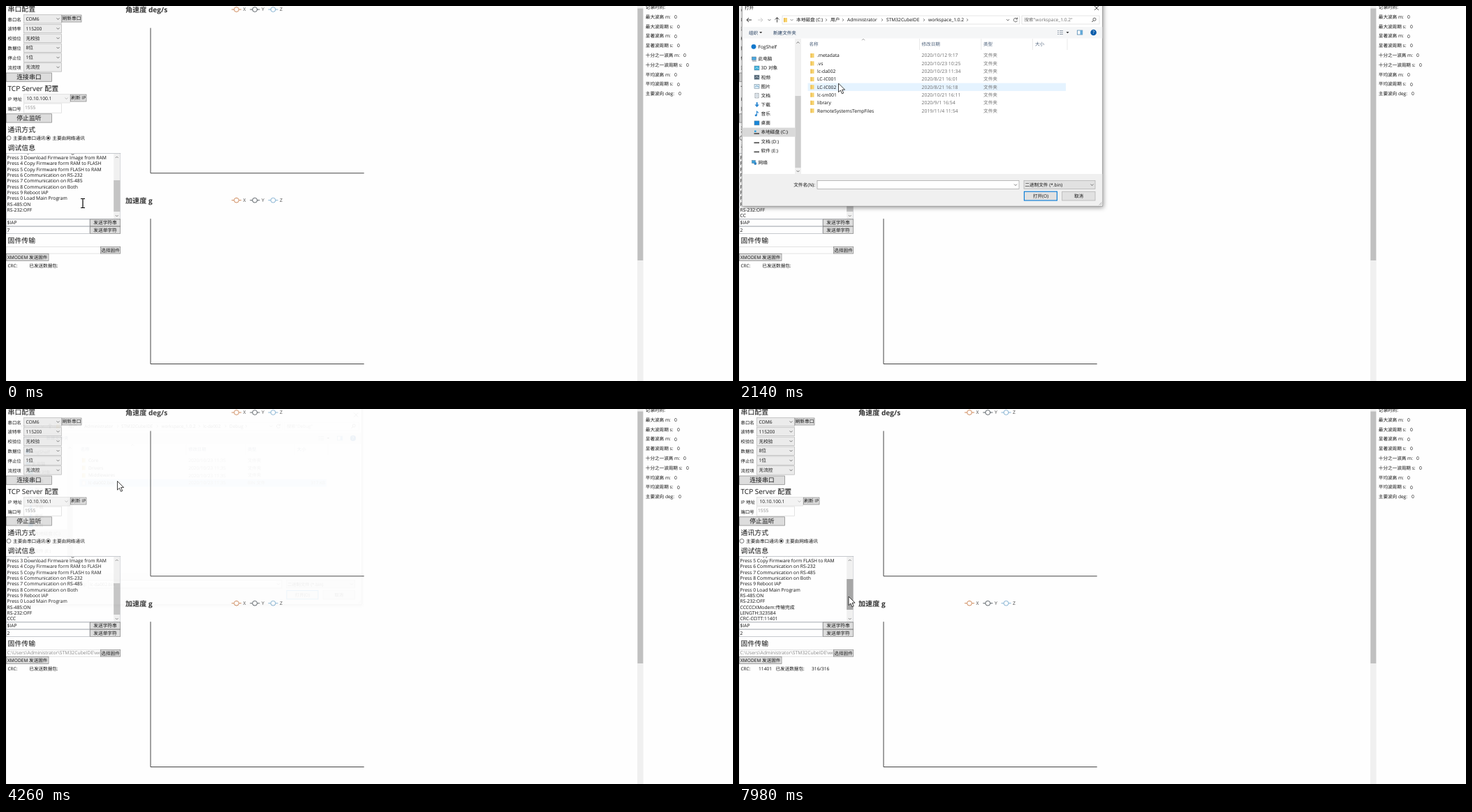
An HTML page that plays this animation: 1041 px wide and 538 px high, repeating every 8 s.

```html
<!DOCTYPE html>
<html lang="zh-CN">
<head>
<meta charset="utf-8">
<title>Firmware upload</title>
<style>
html, body { margin: 0; width: 100%; height: 100%; overflow: hidden; background: #fefefe; }
svg { display: block; }
text { font-family: "Open Sans", "Noto Sans CJK SC", "Noto Sans CJK JP", "Noto Sans CJK", sans-serif; white-space: pre; text-rendering: geometricPrecision; }
</style>
</head>
<body>
<svg id="stage" width="1041" height="538" viewBox="0 0 1041 538"></svg>
<script>
const LOOP = 8000, TICK = 76.9, LAST = 103;
const stage = document.getElementById('stage');

// y is the middle of the line
const text = (s, x, y, size = 6.7, fill = '#111', extra = '') =>
  `<text x="${x}" y="${y + size * .36}" font-size="${size}" fill="${fill}" ${extra}>${s}</text>`;
const mid = (s, x, y, size, fill) => text(s, x, y, size, fill, 'text-anchor="middle"');
const rect = (x, y, w, h, fill, stroke = 'none', width = .7) =>
  `<rect x="${x}" y="${y}" width="${w}" height="${h}" fill="${fill}" stroke="${stroke}" stroke-width="${width}"/>`;
const line = (d, stroke = '#444', width = .8, fill = 'none') =>
  `<path d="${d}" fill="${fill}" stroke="${stroke}" stroke-width="${width}"/>`;
const circle = (x, y, r, fill, stroke = 'none', width = .8) =>
  `<circle cx="${x}" cy="${y}" r="${r}" fill="${fill}" stroke="${stroke}" stroke-width="${width}"/>`;
const down = (x, y, c = '#555') => line(`M${x - 2} ${y - 1}l2 2 2-2`, c);
const up = (x, y, c = '#555') => line(`M${x - 2} ${y + 1}l2-2 2 2`, c);
const right = (x, y, c = '#555') => line(`M${x - 1} ${y - 1.8}l1.8 1.8-1.8 1.8`, c);
const clip = (x, y, w, h, body) =>
  `<svg x="${x}" y="${y}" width="${w}" height="${h}" viewBox="${x} ${y} ${w} ${h}">${body}</svg>`;

// Pointer path: tick, x, y
const track = [
  [0, 110, 283], [3, 70, 322], [5, 70, 322], [8, 142, 324], [11, 150, 326], [13, 158.5, 291.5],
  [16, 150, 346], [19, 150, 350], [22, 150, 350], [25, 140, 104], [28, 142.5, 111],
  [31, 130, 94], [34, 130, 94], [37, 148.5, 97.5], [42, 132, 117], [45, 132, 117],
  [49, 150, 106], [55, 159.5, 103.5], [59, 90, 250], [63, 45, 360], [66, 45, 362],
  [71, 105, 322], [75, 110, 340], [78, 100, 375], [84, 95, 380], [88, 110, 370],
  [92, 150, 322], [96, 181, 290], [99, 178, 280], [103, 157, 269]
];
function pointerAt(n) {
  let i = 1;
  while (i < track.length - 1 && track[i][0] < n) i++;
  const [a, ax, ay] = track[i - 1], [b, bx, by] = track[i];
  const u = (n - a) / (b - a), k = u * u * (3 - 2 * u);
  return [ax + (bx - ax) * k, ay + (by - ay) * k];
}
const inside = ([px, py], x, y, w, h) => px >= x && px < x + w && py >= y && py < y + h;

function button(s, x, y, w, h, p, size = 6.7) {
  const hot = p && inside(p, x, y, w, h);
  return rect(x, y, w, h, hot ? '#bee6fd' : '#dddddd', hot ? '#3c7fb1' : '#808080') +
    mid(s, x + w / 2, y + h / 2, size);
}
function combo(s, y, w = 54, off = false) {
  return rect(25.5, y - 6, w, 12.4, off ? '#f3f3f3' : '#ebebeb', off ? '#dadada' : '#b4b4b4') +
    text(s, off ? 29.5 : 28.5, y) + down(20.5 + w, y, off ? '#aaa' : '#555');
}

function config() {
  let s = line('M.5 0V538', '#e4e4e4', .6);
  s += text('串口配置', 2.5, 4, 9.9);
  const rows = [['串口名', 'COM6'], ['波特率', '115200'], ['校验位', '无校验'], ['数据位', '8位'], ['停止位', '1位'], ['流控项', '无流控']];
  rows.forEach(([label, value], i) => {
    const y = 18.4 + i * 13.87;
    s += text(label, 2.5, y + .8, 6.4) + combo(value, y);
  });
  s += button('刷新串口', 80, 13, 28, 10) + button('连接串口', .5, 96, 65, 12.3, null, 8.9);
  s += text('TCP Server 配置', 2.5, 118, 10);
  s += text('IP 地址', 2.5, 133.3, 6.5) + combo('10.10.100.1', 132.6, 66, true) + button('刷新 IP', 92.5, 127, 22.5, 10);
  s += text('端口号', 2.5, 147.5, 6.4) + rect(25.5, 140, 54, 13.3, '#fefefe', '#d8d8d8') + text('1555', 27, 145.6, 6.7, '#888');
  s += button('停止监听', .5, 154.8, 65, 12.3, null, 8.9);
  s += text('通讯方式', 2.5, 177, 9.9);
  s += circle(4, 189.4, 3, '#fff', '#555') + text('主要由串口通讯', 10, 189.2, 6.65);
  s += circle(60.5, 189.4, 3, '#fff', '#555') + circle(60.5, 189.4, 1.6, '#222') + text('主要由网络通讯', 66.3, 189.2, 6.65);
  return s + text('调试信息', 2.5, 203, 9.9);
}

const log = ['Press 2 Upload Firmware Image to RAM', 'Press 3 Download Firmware Image from RAM',
  'Press 4 Copy Firmware form RAM to FLASH', 'Press 5 Copy Firmware form FLASH to RAM',
  'Press 6 Communication on RS-232', 'Press 7 Communication on RS-485', 'Press 8 Communication on Both',
  'Press 9 Reboot IAP', 'Press 0 Load Main Program', 'RS-485:ON', 'RS-232:OFF'];
const pings = [10, 23, 35, 58, 67], SEND = 73, DONE = 92;

function debug(n, p) {
  const done = n >= DONE, shift = done ? 2 : 0;
  const cs = 'C'.repeat(pings.filter(k => n >= k).length);
  const lines = [...log, cs + (done ? 'XModem:传输完成' : '')];
  if (done) lines.push('LENGTH:323584', 'CRC-CCITT:11401');
  const body = lines.map((s, i) => text(s, 1.5, 209.2 + (i - shift) * 8.35, 6.77)).join('');
  const hot = n < 21 || n > 55 ? inside(p, 154, 211, 10, 95) : false;
  const [top, end] = done ? [244, 288] : [n >= 68 ? 247 : 250, 295];
  return rect(.4, 211.4, 163.3, 94, '#fefefe', '#b0b4ba') + clip(1, 212, 153, 93, body) +
    rect(154.2, 212, 9.2, 93, '#f0f0f0') + rect(154.2, top, 9.2, end - top, hot ? '#a6a6a6' : '#c4c4c4') +
    up(158.7, 217, '#777') + down(158.7, 301, '#777');
}

function transfer(n, p) {
  const free = n < 21 || n > 55 ? p : null;
  const glow = n >= 68 && n <= 72;
  let s = rect(.4, 306, 119.6, 9.8, '#fefefe', '#b0b4ba') + rect(.4, 316.4, 119.6, 10, '#fefefe', '#b0b4ba');
  if (glow) s += rect(.4, 306, 119.6, 9.8, 'none', '#5a9fd8');
  s += text('$IAP', 1.5, 310.8) + text(n < 5 ? '7' : '2', 1.5, 321.3);
  s += button('发送字符串', 120.3, 306, 43.4, 9.8, free) + button('发送单字符', 120.3, 316.4, 43.4, 10, free);
  s += text('固件传输', 2.5, 336.3, 9.9) + rect(.4, 345.5, 135, 9.6, '#fefefe', '#d8d8d8');
  if (n >= 54) s += clip(1, 345, 134, 10, text('C:\\Users\\Administrator\\STM32CubeIDE\\workspace_1.0.2', 1.5, 350, 6.8, '#888'));
  s += button('选择固件', 135.5, 345.5, 28.2, 9.6, free) + button('XMODEM 发送固件', .5, 355.6, 60.5, 9.8, free, 6.6);
  s += text('CRC:', 2.5, 372.6, 6.5);
  const sending = n >= SEND;
  s += text('已发送数据包:', sending ? 52.5 : 33.3, 372.6, 6.6);
  if (sending) {
    const sent = Math.min(316, Math.round((n - SEND + 1) / (DONE - SEND) * 316));
    s += text('11401', 28, 372.6) + text(sent + '/316', 104, 372.6);
  }
  return s;
}

function chart(title, y) {
  let s = text(title, 171, y + 5.8, 10.1, '#333', 'font-weight="700"');
  [['X', 330, '#cf8a5c'], ['Y', 356.3, '#5b6268'], ['Z', 382.5, '#86b3d3']].forEach(([name, x, c]) => {
    s += line(`M${x - 7} ${y + 5}h14`, c, 1) + circle(x, y + 5, 3.4, '#fff', c, 1) + text(name, x + 9.6, y + 4.6, 6.8, '#444');
  });
  return s + line(`M207 ${y + 31.5}V${y + 239.8}H512.7`, '#444', 1);
}

function stats() {
  let s = rect(904, 0, 8.6, 538, '#f0f0f0') + rect(904.3, 3.5, 8, 361.5, '#c0c0c0') + text('记录时间:', 915.8, 1.8, 6.6);
  const rows = [['最大波高 m:', 957], ['最大波周期 s:', 961], ['显著波高 m:', 957], ['显著波周期 s:', 961],
    ['十分之一波高 m:', 970], ['十分之一波周期 s:', 974], ['平均波高 m:', 957], ['平均波周期 s:', 961], ['主要波向 deg:', 963]];
  rows.forEach(([label, x], i) => {
    const y = 15.5 + i * 13.8;
    s += text(label, 915.8, y, 6.6) + text('0', x, y);
  });
  return s;
}

const dirs = [
  { from: 0, find: 'workspace_1.0.2', size: 6.63,
    path: [['本地磁盘 (C:)', 82, 125], ['用户', 131, 149], ['Administrator', 155, 205], ['STM32CubeIDE', 211, 265], ['workspace_1.0.2', 271, 327]],
    files: [['.metadata', '2020/10/12 9:17'], ['.vs', '2020/10/23 10:25'], ['lc-da002', '2020/10/23 11:34'], ['LC-IC001', '2020/8/21 16:01'],
      ['LC-IC002', '2020/8/21 16:18'], ['lc-sm001', '2020/10/21 16:11'], ['library', '2020/9/1 16:54'], ['RemoteSystemsTempFiles', '2019/11/4 11:54']] },
  { from: 35, find: 'lc-da002',
    path: [['用户', 82, 100], ['Administrator', 106, 156], ['STM32CubeIDE', 161, 215], ['workspace_1.0.2', 221, 278], ['lc-da002', 283.5, 317]],
    files: [['.git', '2020/10/23 11:34'], ['.settings', '2020/10/23 11:34'], ['CMSIS', '2020/10/23 11:34'], ['Core', '2020/10/23 10:25'],
      ['Debug', '2020/10/23 11:35'], ['Drivers', '2020/10/23 10:25'], ['Middlewares', '2020/10/23 11:34']] },
  { from: 45, find: 'Debug',
    files: [['Core', '2020/10/23 11:35'], ['Drivers', '2020/10/23 11:35'], ['Middlewares', '2020/10/23 11:35'], ['lc-da002.bin', '2020/10/23 11:35', '317 KB']] }
];
dirs[2].path = [...dirs[1].path, ['Debug', 323, 348]];

const folder = (x, y, c = '#f7d36f') => rect(x, y - 3, 5, 6.2, c) + rect(x, y - 3, 1.3, 6.2, '#e9b949');

function sidebar() {
  let s = rect(4.5, 174.6, 75.5, 13, '#d9d9d9');
  s += circle(21, 58.3, 3.4, '#1177cc') + text('FogShelf', 27.5, 58.2);
  s += rect(18.5, 73, 6, 4.5, '#48a7e0', '#5a6b78', .5) + line('M19 79h6', '#5a6b78') + text('此电脑', 27.5, 76);
  const items = ['3D 对象', '视频', '图片', '文档', '下载', '音乐', '桌面', '本地磁盘 (C:)', '文档 (D:)', '软件 (E:)'];
  items.forEach((name, i) => {
    const y = 89 + i * 13.15;
    s += text(name, 31.5, y);
    if (i > 6) s += line(`M21.5 ${y + 2}h7.5`, '#555', 1.8) + (i == 7 ? rect(22, y - 2.5, 2.6, 2.4, '#28a0e0') : '');
    else if (i == 4) s += line(`M25.7 ${y - 3.5}v5`, '#2a86d0', 2) + line(`M22.5 ${y}h6.4l-3.2 3.6z`, 'none', 0, '#2a86d0');
    else if (i == 5) s += line(`M25.5 ${y + 2}v-5.5l2.5 2.2`, '#2a86d0', 1.1) + circle(24.3, y + 2, 1.6, '#2a86d0');
    else if (i == 3) s += rect(23, y - 3.2, 5, 6.6, '#fff', '#7d8b96', .7) + line(`M24 ${y - 1}h3m-3 2h3`, '#7d9bb6', .6);
    else s += rect(22, y - 3, 7, 6, ['#38b0dc', '#566573', '#dcecf6', '', '', '', '#1686d9'][i], '#607d90', .5) +
      (i < 3 ? line(`M23.3 ${y + 1}l2-2 3 2`, i == 2 ? '#3d86b5' : '#d8edf7') : '');
  });
  s += rect(18.5, 221.5, 5, 4, '#3ba0dc', '#4f7690', .5) + circle(23.3, 226, 1.9, '#3485c4') + text('网络', 27.5, 224.5);
  return s + rect(80, 47, 9, 194, '#f0f0f0') + rect(80.4, 129, 8.2, 103, '#cdcdcd') + up(84.5, 52.5) + down(84.5, 237);
}

function dialog(n, p) {
  const dir = dirs.filter(d => n >= d.from).pop();
  const picked = n >= 50;
  let s = rect(4.3, -28, 516.4, 315, '#fff', '#8b8b8b', .8) + rect(4.7, 241, 515.6, 45.6, '#f0f0f0');
  s += text('打开', 8, 2.6, 6.6) + line('M509 0l6 6m0-6l-6 6', '#222', .8);
  // address bar
  s += line('M18 20h-7m3-3l-3 3 3 3', '#333', 1) + line('M27 20h7m-3-3l3 3-3 3', '#ccc', 1) + down(43.5, 20) + line('M54.5 23.5v-7m-3 3l3-3 3 3', '#444', 1);
  s += rect(62, 14, 339.5, 12, '#fff', '#d9d9d9') + folder(64, 20) + down(75.5, 20, '#777');
  dir.path.forEach(([name, x, sep]) => s += text(name, x, 20, 6.65) + right(sep, 20));
  s += down(385, 20) + line('M398.2 18.5a2.7 2.7 0 1 0 .3 2.5M398.6 16.5v2.4h-2.4', '#444', .8);
  s += rect(405, 14, 111, 12, '#fff', '#d9d9d9') + text(`搜索"${dir.find}"`, 408.5, 20, 6.6, '#6d6d6d');
  s += circle(509, 19.2, 2.1, 'none', '#444') + line('M507.4 20.8l-2 2.2', '#444', 1);
  // toolbar
  s += rect(4.7, 30, 515.6, 16.5, '#f5f6f7') + text('组织', 14, 38.2, 6.6, '#1e395b') + line('M29.2 37h4l-2 2.2z', 'none', 0, '#333') + text('新建文件夹', 49, 38.2, 6.6, '#1e395b');
  s += line('M456 35.5h2m1 0h5M456 38h2m1 0h5M456 40.5h2m1 0h5', '#8795a3', .9) + line('M468.5 37h4l-2 2.2z', 'none', 0, '#333');
  s += rect(484.3, 35, 7.5, 6, '#fff', '#3779a8') + rect(488.5, 35, 3.3, 6, '#62a8d8') + circle(507.6, 38, 4.3, '#0a5ba9') + mid('?', 507.6, 38, 6.5, '#fff');
  // file list
  [['名称', 100.5], ['修改日期', 261.5], ['类型', 350], ['大小', 424]].forEach(([name, x]) => s += text(name, x, 55, 6.6, '#4c607a'));
  s += line('M258.5 47V63M346.8 47V63M420.5 47V63M470 47V63', '#e5e5e5') + up(178, 48.2, '#888');
  const row = p[0] > 98 && p[0] < 468 ? Math.round((p[1] - 71) / 11.3) : -1;
  dir.files.forEach(([name, date, size], i) => {
    const y = 71 + i * 11.3;
    if (i == row) s += rect(98.5, y - 5.6, 369.5, 11.3, picked ? '#cce8ff' : '#e5f3ff');
    s += size ? rect(102.5, y - 3, 5, 6.2, '#fff', '#999', .5) : folder(102.5, y, name == '.git' ? '#fbeec2' : undefined);
    s += text(name, 112, y, 6.7) + text(date, 261.5, y, 6.9, '#6d6d6d') + text(size ? 'BIN 文件' : '文件夹', 350, y, 6.7, '#6d6d6d');
    if (size) s += text(size, 466, y, 6.7, '#6d6d6d', 'text-anchor="end"');
  });
  s += sidebar();
  // footer
  s += text('文件名(N):', 109, 256.6, 6.7, '#111', 'text-anchor="end"') + rect(112, 250.5, 289, 12, '#fff', '#a0a0a0') + down(396, 256.6);
  if (picked) s += text('lc-da002.bin', 114, 256.6);
  s += rect(408, 250.5, 102, 12, '#e1e1e1', '#adadad') + text('二进制文件 (*.bin)', 409.5, 256.6, 6.6) + down(505.5, 256.6);
  s += rect(408.4, 266.2, 47, 12.8, '#e1e1e1', '#0078d7', 1.1) + mid('打开(O)', 432, 272.6, 6.6) + rect(462.7, 266.2, 47.3, 12.8, '#e1e1e1', '#adadad') + mid('取消', 486.5, 272.6, 6.6);
  return s + line('M515.5 285.5l4-4m-2 4l2-2', '#aaa', .8);
}

// Window fades and scales while it opens and closes
const fade = n => n < 21 || n > 55 ? 0 : n == 21 ? .15 : n == 22 ? .6 : n < 54 ? 1 : n == 54 ? .55 : .06;

function cursor(n, p) {
  const beam = !fade(n) && (inside(p, 0, 211, 154, 95) || inside(p, 0, 306, 120, 21));
  const shape = beam
    ? line('M-3-6.5h2.4L0-6l.6-.5H3M-3 6.5h2.4L0 6l.6.5H3M0-6V6', '#000', 1.2)
    : line('M0 0V12.6L2.9 9.9 5 14.8 7.2 13.9 5.1 9.1H9.1Z', '#111', .8, '#fff');
  return `<g transform="translate(${p[0]} ${p[1]})">${shape}</g>`;
}

const still = config() + chart('角速度 deg/s', 0) + chart('加速度 g', 273.7) + stats();

function scene(n) {
  const p = pointerAt(n), k = fade(n), z = .955 + .045 * k;
  const win = k ? `<g opacity="${k}" transform="translate(255 131) scale(${z}) translate(-255 -131)" style="filter:drop-shadow(1px 2px 3px #0006)">${dialog(n, p)}</g>` : '';
  return still + debug(n, p) + transfer(n, p) + win + cursor(n, p);
}

const start = performance.now();
let shown = -1;
function play() {
  const t = (performance.now() - start) % LOOP;
  const n = Math.min(LAST, Math.floor(t / TICK + .25));
  if (n !== shown) stage.innerHTML = scene(shown = n);
  requestAnimationFrame(play);
}
play();
</script>
</body>
</html>
```
